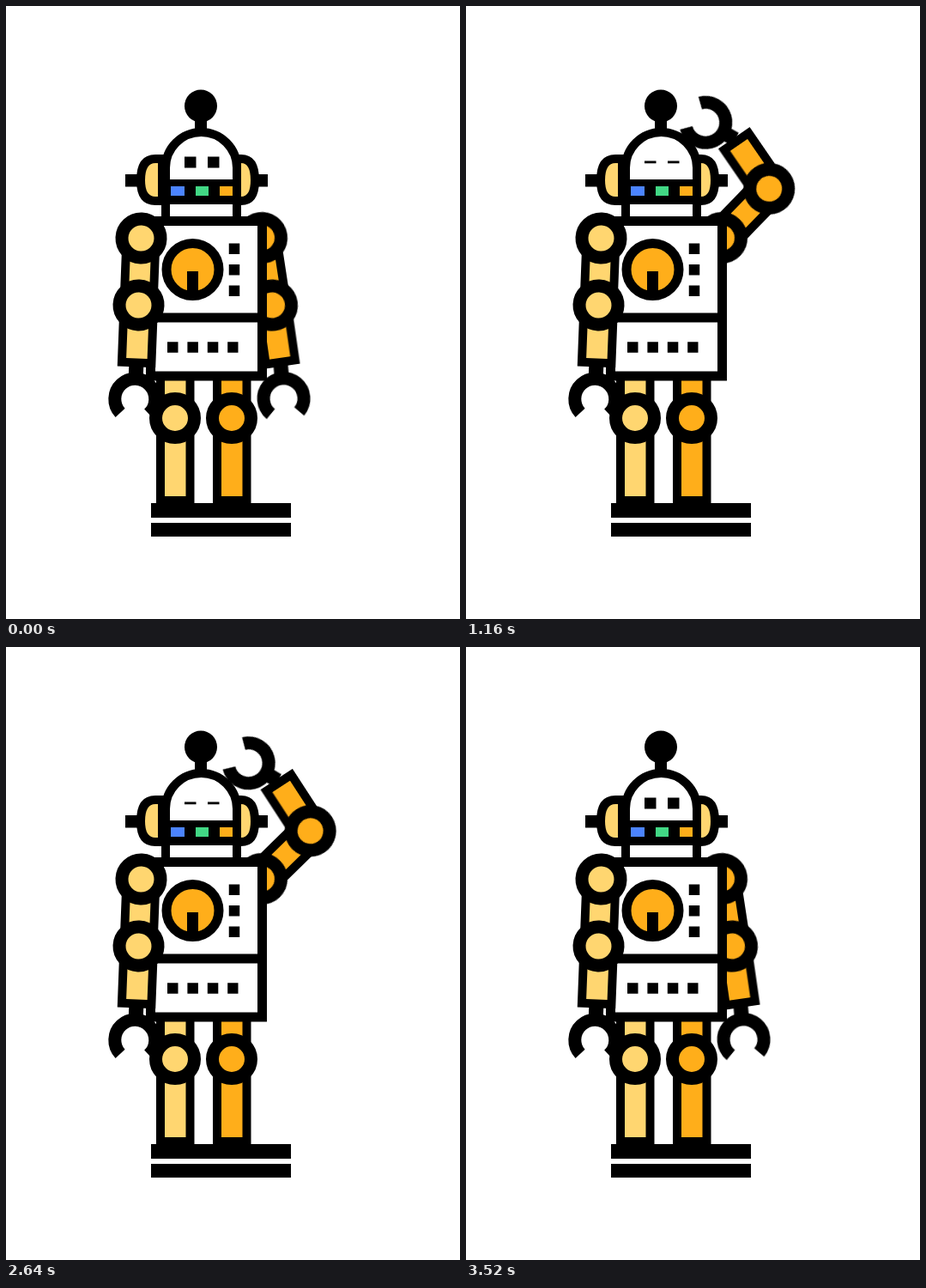
Animation, 529 px wide and 714 px high, one loop 3.56 s. Source, as an HTML page without scripts:

```html
<!DOCTYPE html>
<html lang="en">
<head>
<meta charset="utf-8">
<title>Saluting robot</title>
<style>
  html, body { margin: 0; width: 100%; height: 100%; overflow: hidden; background: #fff; }
  svg { display: block; width: 100vw; height: 100vh; }
  .light { fill: #ffd670; }
  .orange { fill: #ffae1a; }
  .white { fill: #fff; }
  .line { stroke: #000; stroke-width: 10; }
  .body { stroke: #000; stroke-width: 11; }
  .joint { stroke: #000; stroke-width: 15; }

  .upper, .fore, .hand, .eyes {
    animation: 3560ms cubic-bezier(.333, 0, .667, 1) infinite;
  }
  .upper { animation-name: shoulder; }
  .fore { animation-name: elbow; }
  .hand { animation-name: wrist; }
  .eyes { animation-name: blink; }

  @keyframes shoulder {
    0%, 11.26% { transform: rotate(-8.7deg); }
    30.5%, 32.6% { transform: rotate(-136deg); }
    38%, 73.5% { transform: rotate(-135deg); }
    92.75%, 100% { transform: rotate(-8.7deg); }
  }
  @keyframes elbow {
    0%, 11.26% { transform: rotate(.5deg); }
    30.5%, 75.4% { transform: rotate(-78.5deg); }
    94.4%, 100% { transform: rotate(.5deg); }
  }
  @keyframes wrist {
    0%, 13.3% { transform: rotate(3deg); }
    32.5%, 78.7% { transform: rotate(-26deg); }
    95.8%, 100% { transform: rotate(3deg); }
  }
  @keyframes blink {
    0%, 15.7% { transform: scaleY(1); }
    31.5%, 80.9% { transform: scaleY(.22); }
    94.4%, 100% { transform: scaleY(1); }
  }
</style>
</head>
<body>
<svg viewBox="0 0 529 714">
  <defs>
    <circle id="joint" class="joint" r="22.5"/>
    <rect id="upper" class="line" x="-17" width="34" height="78"/>
    <rect id="fore" class="line" x="-17" width="34.5" height="67"/>
    <g id="claw">
      <path d="M0 0V16" stroke="#000" stroke-width="17"/>
      <path class="joint" fill="none" d="M-16.6 56.1A23.5 23.5 0 1 1 16.6 56.1"/>
    </g>
    <g id="leg">
      <rect class="line" x="-17" y="425" width="34.5" height="151"/>
      <use href="#joint" y="480"/>
    </g>
  </defs>

  <!-- waving arm -->
  <g class="orange" transform="translate(298 270)">
    <g class="upper">
      <use href="#upper"/>
      <use href="#joint"/>
      <g transform="translate(0 79.5)">
        <g class="fore">
          <g transform="translate(0 70)"><use class="hand" href="#claw"/></g>
          <use href="#fore"/>
          <use href="#joint"/>
        </g>
      </g>
    </g>
  </g>

  <!-- legs and base -->
  <use class="light" href="#leg" x="197"/>
  <use class="orange" href="#leg" x="263"/>
  <path d="M169 579H332V596H169ZM169 602H332V618H169Z"/>

  <!-- head -->
  <circle cx="227" cy="116.5" r="19"/>
  <path d="M220 130H234V146H220ZM139 196H154V210.5H139ZM293 196H305V210.5H293Z"/>
  <path class="white line" d="M186 250V188.5A41.5 41.5 0 0 1 269 188.5V250Z"/>
  <g class="light line">
    <path d="M182 178H174Q157 178 157 203Q157 227 174 227H182Z"/>
    <path d="M269 178H274Q290 178 290 203Q290 227 274 227H269Z"/>
  </g>
  <path d="M186 202H269V231H186Z"/>
  <rect x="192" y="210" width="16" height="11" fill="#4c84ff"/>
  <rect x="221" y="210" width="15" height="11" fill="#42d885"/>
  <rect class="orange" x="249" y="210" width="15" height="11"/>
  <g transform="translate(228 182)">
    <path class="eyes" d="M-20 -6.5H-6.5V6.5H-20ZM7 -6.5H20.5V6.5H7Z"/>
  </g>

  <!-- body -->
  <path class="white body" d="M168.5 250.5H298.5V431H168.5ZM168.5 363H298.5"/>
  <circle class="orange body" cx="217.5" cy="307" r="30.5"/>
  <path d="M211 309H224V335H211Z"/>
  <path d="M266 276.5V338" stroke="#000" stroke-width="12.5" stroke-dasharray="12.5 12"/>
  <path d="M188 397.5H270.5" stroke="#000" stroke-width="12.5" stroke-dasharray="12.5 10.9"/>

  <!-- resting arm -->
  <g class="light" transform="translate(157.5 270.5) rotate(2.2)">
    <use href="#upper"/>
    <use href="#joint"/>
    <g transform="translate(0 78)">
      <use href="#claw" y="70"/>
      <use href="#fore"/>
      <use href="#joint"/>
    </g>
  </g>
</svg>
</body>
</html>
```
